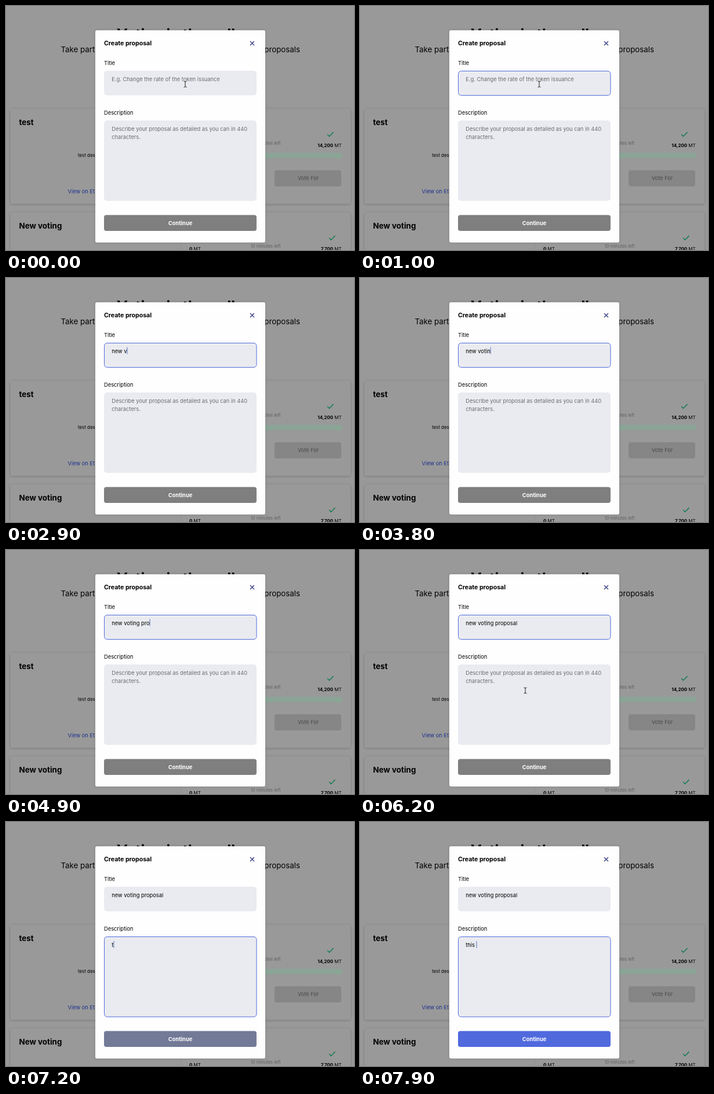
These frames come from a looping animation (600x422 px, 8 s). An HTML page with a canvas:

```html
<!DOCTYPE html>
<html lang="en">
<head>
<meta charset="utf-8">
<title>Create proposal</title>
<style>
  html, body { margin: 0; width: 100%; height: 100%; overflow: hidden; background: #999; }
  canvas { display: block; width: 600px; height: 422px; }
</style>
</head>
<body>
<canvas id="stage"></canvas>
<script>
const W = 600, H = 422, LOOP = 8000, STEP = 100;
const canvas = document.getElementById('stage');
const ctx = canvas.getContext('2d');
const dpr = window.devicePixelRatio || 1;
canvas.width = W * dpr;
canvas.height = H * dpr;
ctx.scale(dpr, dpr);

const BODY = 9.3, SMALL = 7.9;
const FIELD = '#eaebf0', BLUE = [80, 106, 222], GREY = [127, 127, 127];

// Time of each key press, one per character.
const titleTyping = {
  text: 'new voting proposal',
  keys: [1700, 1900, 2000, 2600, 2900, 3300, 3600, 3700, 3800, 3900,
         4100, 4700, 4800, 4900, 5000, 5100, 5300, 5400, 5600]
};
const descTyping = { text: 'this ', keys: [7200, 7300, 7400, 7500, 7800] };
const titleCaret = [[400, 1000], [1600, 2500], [2600, 4600], [4700, 5900]];
const descCaret = [[6400, 6900], [7200, 8000]];

const clamp = v => Math.max(0, Math.min(1, v));
const ramp = (t, from, to) => clamp((t - from) / (to - from));
const ease = p => p * p * (3 - 2 * p);
const mix = (a, b, p) => a + (b - a) * p;
const rgb = (c, alpha = 1) => `rgba(${c.join(',')},${alpha})`;
const within = (t, spans) => spans.some(([a, b]) => t >= a && t < b);
const typed = (t, { text, keys }) => text.slice(0, keys.filter(k => k <= t).length);

function label(str, x, y, size, { color = '#000', weight = 400, align = 'left' } = {}) {
  ctx.font = `${weight} ${size}px Inter, sans-serif`;
  ctx.textAlign = align;
  ctx.fillStyle = color;
  ctx.fillText(str, x, y);
  return ctx.measureText(str).width;
}

function box(x, y, w, h, r, fill) {
  ctx.beginPath();
  ctx.roundRect(x, y, w, h, r);
  ctx.fillStyle = fill;
  ctx.fill();
}

function path(points, color, width) {
  ctx.beginPath();
  points.forEach(([x, y], i) => i ? ctx.lineTo(x, y) : ctx.moveTo(x, y));
  ctx.strokeStyle = color;
  ctx.lineWidth = width;
  ctx.stroke();
}

function card(y, h) {
  ctx.save();
  ctx.shadowColor = 'rgba(0,0,0,.2)';
  ctx.shadowBlur = 5 * dpr;
  ctx.shadowOffsetY = dpr;
  box(8, y, 586, h, 3, '#999');
  ctx.restore();
}

function check(x, y) {
  path([[x - 5, y], [x - 1.5, y + 3.5], [x + 5.5, y - 3.8]], '#087a4b', 1.3);
}

function amount(value, y) {
  const unit = label(' MT', 578.5, y, SMALL, { align: 'right' });
  label(value, 578.5 - unit, y, SMALL, { weight: 700, align: 'right' });
}

function timeLeft(y) {
  label('10 minutes left', 473.5, y, 7.6, { color: '#616161', align: 'right' });
}

function page() {
  ctx.fillStyle = '#999';
  ctx.fillRect(0, 0, W, H);
  label('Voting in the polls', 300, 58, 25, { weight: 700, align: 'center' });
  label('Take part in', 94.5, 80, 13.3);
  label('for proposals', 507, 80, 13.3, { align: 'right' });

  card(178, 164);
  label('test', 22.5, 205.5, 13.4, { weight: 700 });
  label('test des', 124, 261, SMALL);
  label('View on Et', 106.5, 323.5, BODY, { color: '#1d3190' });
  check(559, 222);
  timeLeft(239.5);
  amount('14,200', 244);
  box(316, 254, 263, 9.5, 2, '#8aa596');
  box(463, 284, 115, 28, 4, '#868686');
  label('Vote For', 521, 301.3, BODY, { color: '#4b4b4b', align: 'center' });

  card(357, 90);
  label('New voting', 22.5, 384.5, 13.4, { weight: 700 });
  check(562, 401);
  timeLeft(418);
  amount('7,700', 423);
  const w = label('0', 316, 423, SMALL, { weight: 700 });
  label(' MT', 316 + w, 423, SMALL);
  path([[301, 357], [301, 422]], '#8f8f8f', 0.7);
}

function field(y, h, focus) {
  box(169, y, 263, h, 5, FIELD);
  if (!focus) return;
  ctx.beginPath();
  ctx.roundRect(169.5, y + 0.5, 262.5, h - 0.5, 5);
  ctx.strokeStyle = rgb(BLUE, focus);
  ctx.lineWidth = 1;
  ctx.stroke();
}

function entry(value, hint, y, caretOn) {
  let w = 0;
  if (value) w = label(value, 182.3, y, BODY);
  else hint.forEach((line, i) => label(line, 182.3, y + i * 14, BODY, { color: '#6b6b6e' }));
  if (caretOn) path([[182.8 + w, y - 10], [182.8 + w, y + 2]], '#4561b5', 0.9);
}

function modal(t) {
  ctx.save();
  ctx.shadowColor = 'rgba(0,0,0,.12)';
  ctx.shadowBlur = 5 * dpr;
  box(154, 42, 293, 367, 3, '#fefefe');
  ctx.restore();

  label('Create proposal', 169, 68, 10.56, { weight: 700 });
  path([[421, 61], [428, 68]], '#252b78', 1.1);
  path([[428, 61], [421, 68]], '#252b78', 1.1);

  const swap = ramp(t, 6300, 6700);
  label('Title', 169, 102, BODY);
  field(112, 42.5, ramp(t, 300, 700) * (1 - swap));
  entry(typed(t, titleTyping), ['E.g. Change the rate of the token issuance'],
    129.6, within(t, titleCaret));

  label('Description', 169, 188.3, BODY);
  field(198, 139, swap);
  entry(typed(t, descTyping),
    ['Describe your proposal as detailed as you can in 440', 'characters.'],
    216, within(t, descCaret));

  const on = ramp(t, 7100, 7500);
  box(169, 361.5, 263, 27.5, 4, rgb(GREY.map((c, i) => mix(c, BLUE[i], on))));
  label('Continue', 300.5, 379, BODY, { color: '#fff', weight: 700, align: 'center' });
}

function pointer(t) {
  if (within(t, [[1700, 5900], [7200, LOOP]])) return;
  const p = ease(ramp(t, 5800, 6200));
  const x = mix(309, 285, p), y = mix(135.3, 243, p);
  for (const [color, width] of [['rgba(255,255,255,.7)', 2.4], ['#111', 1]]) {
    path([[x, y - 4], [x, y + 4]], color, width);
    for (const s of [-1, 1]) {
      path([[x - 2.5, y + s * 5], [x - 1, y + s * 4.8], [x, y + s * 4],
            [x + 1, y + s * 4.8], [x + 2.5, y + s * 5]], color, width);
    }
  }
}

function frame(now) {
  const t = Math.floor((now % LOOP) / STEP) * STEP;
  page();
  modal(t);
  pointer(t);
  requestAnimationFrame(frame);
}
requestAnimationFrame(frame);
</script>
</body>
</html>
```
